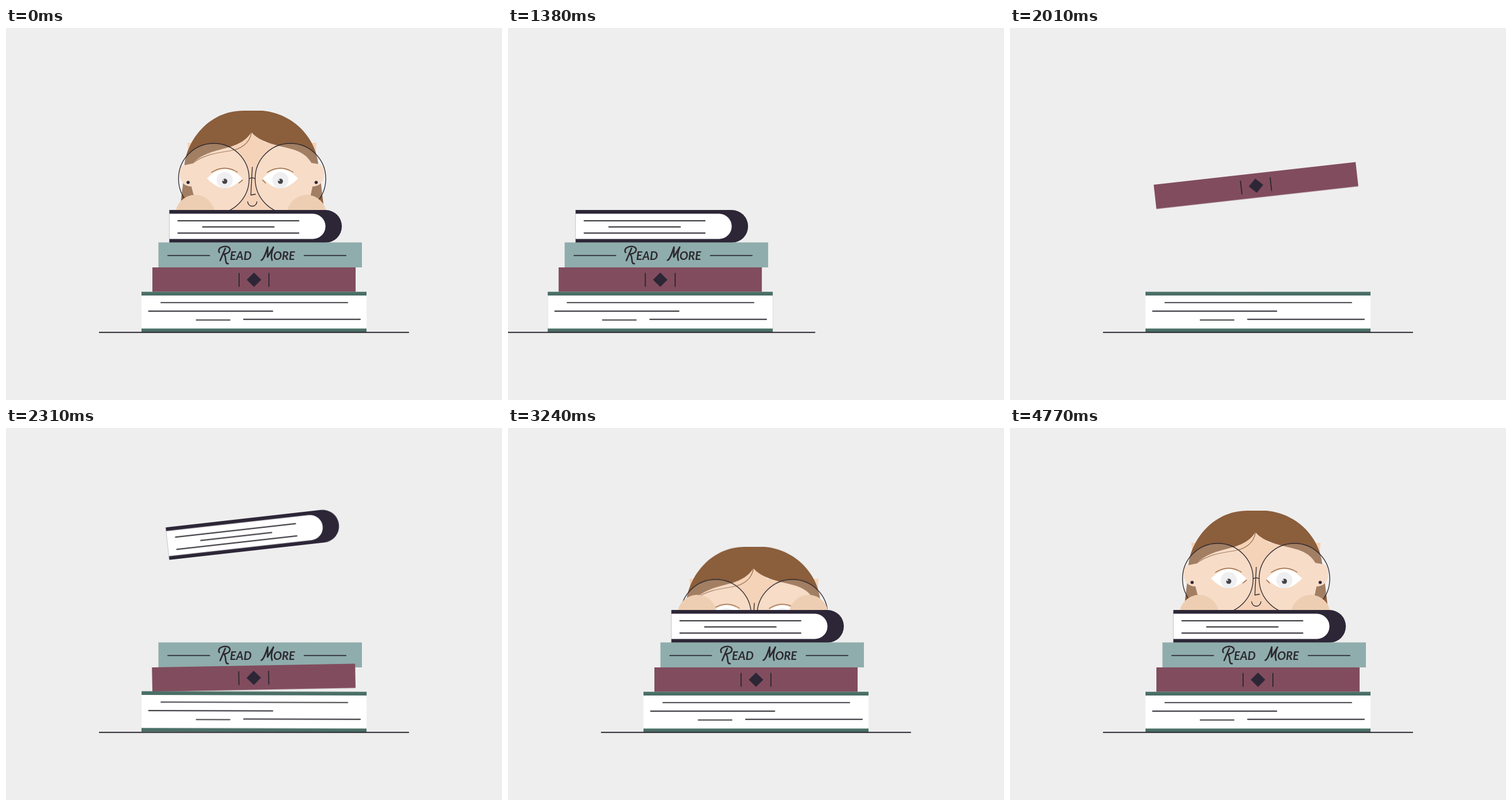
Animation of 864 by 648 pixels, one loop 4.8 s. Source, as an HTML page without scripts:

```html
<!DOCTYPE html>
<html lang="en">
<head>
<meta charset="utf-8">
<title>Read More</title>
<style>
  html, body { margin: 0; width: 100%; height: 100%; overflow: hidden; background: #eee; }
  svg { display: block; width: 100%; height: 100%; }

  :root {
    --fall: cubic-bezier(.333, 0, .667, .333);
    --rise: cubic-bezier(.333, .667, .667, 1);
  }
  .ink { fill: none; stroke: #2d2930; stroke-width: 1.9; stroke-linecap: round; stroke-linejoin: round; }
  .thin { stroke-width: 1.3; }
  .lash { stroke: #8b5e3c; stroke-width: 1.2; }
  .letters { font: italic 700 20px Lato, sans-serif; fill: #2d2930; }
  .cover { fill: #2c2637; }
  .hair { fill: #8b5e3c; }
  .skin { fill: #f5d3b9; }
  .hand { fill: #eeceb2; }
  .lens { fill: #fff; fill-opacity: .2; stroke: #2d2930; stroke-width: 1.3; }

  .head, .hands, .old, .ground, .book { animation: 4.8s linear infinite both; }
  .head { animation-name: head; }
  .hands { animation-name: hands; }
  .old { animation-name: slide; }
  .ground { animation-name: draw; stroke-dasharray: 1 1.1; }

  /* Each book falls on one bottom corner, tips level and bounces once. */
  .book { animation-name: drop; animation-delay: calc(var(--i) * 150ms); }
  .green { --i: 0; --tilt: 24deg; transform-origin: 628px 530px; }
  .plum { --i: 1; --tilt: -24deg; transform-origin: 255px 459.5px; }
  .teal { --i: 2; --tilt: 24deg; transform-origin: 620px 417px; }
  .black { --i: 3; --tilt: -24deg; transform-origin: 284.5px 374px; }

  @keyframes head {
    0% { transform: none; animation-timing-function: cubic-bezier(.7, 0, .79, 0); }
    15.625% { transform: translateY(185px); }
    63.75% { transform: translateY(185px); animation-timing-function: cubic-bezier(.2, 1, .34, 1); }
    84.583%, 100% { transform: none; }
  }
  @keyframes hands {
    0% { transform: none; }
    14.375% { transform: none; animation-timing-function: var(--fall); }
    17.5% { transform: translateY(28px); }
    59.375% { transform: translateY(28px); animation-timing-function: var(--rise); }
    64.167%, 100% { transform: none; }
  }
  @keyframes slide {
    0% { transform: none; }
    18.75% { transform: none; animation-timing-function: cubic-bezier(.405, 0, .745, 0); }
    33.75%, 100% { transform: translateX(-720px); }
  }
  @keyframes draw {
    0% { stroke-dashoffset: 1.02; }
    33.333% { stroke-dashoffset: 1.02; animation-timing-function: cubic-bezier(.4, 0, .2, 1); }
    39.583%, 100% { stroke-dashoffset: 0; }
  }
  @keyframes drop {
    0% { transform: translateY(-540px) rotate(var(--tilt)); }
    36.354% { transform: translateY(-540px) rotate(var(--tilt)); animation-timing-function: var(--fall); }
    41.875% { transform: translateY(0) rotate(0deg); animation-timing-function: var(--rise); }
    45.875% { transform: translateY(0) rotate(calc(var(--tilt) * .046)); animation-timing-function: var(--fall); }
    49.854%, 100% { transform: translateY(0) rotate(0deg); }
  }
</style>
</head>
<body>
<svg viewBox="0 0 864 648" role="img" aria-label="A reader peeking over a stack of books">
  <defs>
    <clipPath id="above"><rect width="864" height="317.5"/></clipPath>

    <g id="black">
      <path class="cover" d="M284.5 317H556.5a28.5 28.5 0 0 1 0 57H284.5z"/>
      <path fill="#fff" d="M284.5 323.5H534.5a22 22 0 0 1 0 44H284.5z"/>
      <path class="ink" d="M299.5 335.7H510M342.5 346.5H467M299.5 357.3H510"/>
    </g>
    <g id="teal">
      <path fill="#8fadac" d="M265.5 373.5H620V417H265.5z"/>
      <path class="ink" d="M282 396.4H354.5M519.5 396.4H592"/>
      <g class="ink" stroke-width="2.6" style="stroke-width:2.6">
        <path d="M382 384L373 405M371.500 391C368 384 376 380 383 380.500C393 381 393 392 379.500 394C385 398 380 411 387 410.500"/>
        <path d="M444.500 404.500C449 404 453 390 456 381.500L455.500 399L466 381.500C462 391 461 398 463.500 404.500"/>
      </g>
      <text class="letters" x="390" y="404.300">EAD</text>
      <text class="letters" x="465.500" y="404.300">ORE</text>
    </g>
    <g id="plum">
      <path fill="#814d5e" d="M255 417H609V459.5H255z"/>
      <path class="cover" d="M432 426l12.600 12.500L432 451l-12.600-12.500z"/>
      <path class="ink" d="M406 427.500V450M458 427.500V450"/>
    </g>
    <g id="green">
      <path fill="#4a6f66" d="M236 459.500H628V530H236z"/>
      <path fill="#fff" d="M236 466H628V523.500H236z"/>
      <path class="ink" d="M270 478.400H595M248.500 493.300H464.500M331.500 508.600H390M414 507.500H617"/>
    </g>

    <g id="eye">
      <path fill="#fff" d="M-31 262C-20 251 -10 246 0 246S20 251 31 262C20 273 10 279 0 279S-20 273 -31 262z"/>
      <circle cy="265" r="14" fill="#efeff1"/>
      <circle cy="267" r="4.500" fill="#454348"/>
      <circle cx="-2.500" cy="265" r="1.500" fill="#efeff1"/>
      <path class="ink lash" d="M-23 251.500Q0 237 22 251"/>
    </g>
  </defs>

  <g clip-path="url(#above)">
    <g class="head">
      <path class="hair" d="M309 265L302 325H335V265zM548 265L555 325H522V265z"/>
      <path class="skin" d="M316 200H541L534 276Q530 300 516 330H342Q328 300 323 276z"/>
      <path class="skin" d="M325 236C308 233 302 243 302.500 254C303 268 310 276 324 276zM532 236C549 233 555 243 554.500 254C554 268 547 276 533 276z"/>
      <path class="skin" d="M427.500 180L390 215H470z"/>
      <path class="hair" d="M311 239C314 200 350 144 414 144H447C505 150 540 195 544 237L532 235C520 214 498 211 478 206C455 200 438 194 427.500 181.500C416 200 396 206 376 211C350 217 334 226 325 236z"/>
      <path class="ink lash" d="M427.500 182C425 200 410 211 390 214C362 218 344 222 325 235.500"/>
      <circle class="lens" cx="362" cy="262.500" r="61.500"/>
      <circle class="lens" cx="495.500" cy="262.500" r="61.500"/>
      <use href="#eye" x="381"/>
      <use href="#eye" x="478"/>
      <path class="ink lash" d="M406 270L412 265M452 270L447 265"/>
      <path class="ink thin" d="M423.500 262.500Q429 259.500 434 262.500M429 242.500L426.500 291L434.500 289.500M421 302.500a8 8 0 0 0 16 0"/>
      <circle class="cover" cx="317.200" cy="269" r="2.800"/>
      <circle class="cover" cx="540.300" cy="269" r="2.800"/>
    </g>
    <g class="hands">
      <circle class="hand" cx="329.500" cy="325" r="34.400"/>
      <circle class="hand" cx="523.800" cy="325" r="34.400"/>
    </g>
  </g>

  <g class="old">
    <use href="#black"/>
    <use href="#teal"/>
    <use href="#plum"/>
    <use href="#green"/>
    <path class="ink" style="stroke-linecap:butt" d="M702 530.200H162"/>
  </g>

  <g class="book black"><use href="#black"/></g>
  <g class="book teal"><use href="#teal"/></g>
  <g class="book plum"><use href="#plum"/></g>
  <g class="book green"><use href="#green"/></g>
  <path class="ink ground" style="stroke-linecap:butt" pathLength="1" d="M702 530.200H162"/>
</svg>
</body>
</html>
```
